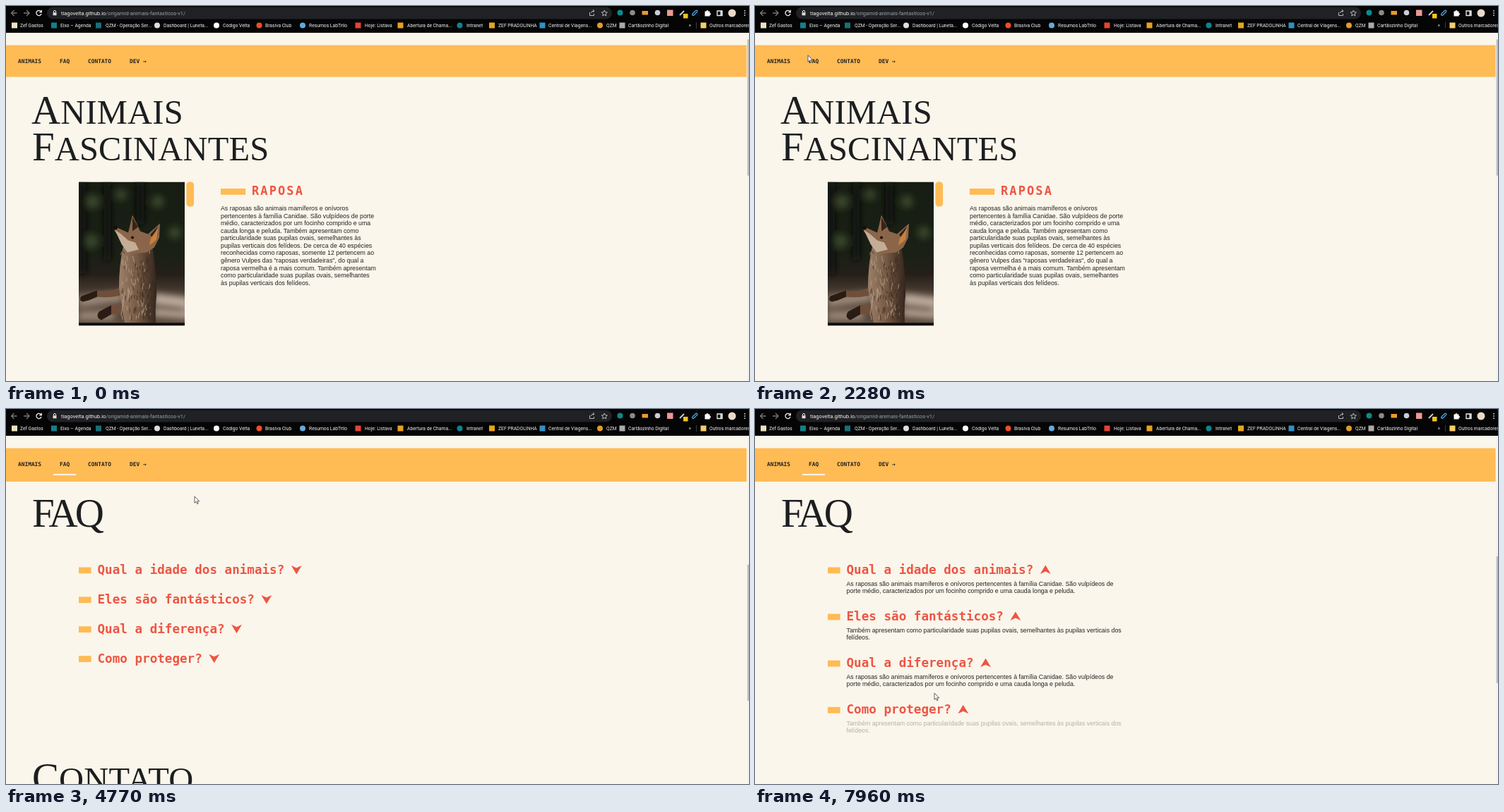
An HTML page that plays this animation: 1052 by 532 pixels, repeating every 8 s.

```html
<!DOCTYPE html>
<html lang="pt-BR">
<head>
<meta charset="utf-8">
<title>Animais</title>
<style>
html, body { margin: 0; width: 100%; height: 100%; overflow: hidden; background: #faf6eb; }
svg { display: block; }
text { white-space: pre; }
.ui { font: 6.75px Roboto, sans-serif; fill: #f4f4f4; }
.url { font-size: 7.45px; }
.nav { font: bold 7.85px "DejaVu Sans Mono", monospace; fill: #222; }
.title { font: 57px "Liberation Serif", serif; fill: #1d1e20; }
.title tspan { font-size: 48.5px; letter-spacing: .2px; }
.head { font: bold 17.6px "DejaVu Sans Mono", monospace; fill: #e54; }
.body { font: 8.8px "Liberation Sans", Arial, sans-serif; fill: #222; }
.wide { font-size: 17px; letter-spacing: 2.1px; }
.line { fill: none; stroke: #eee; stroke-width: 1.3; }
</style>
</head>
<body>
<svg width="1052" height="532" viewBox="0 0 1052 532">
  <defs>
    <linearGradient id="wood" x1="0" y1="0" x2="0" y2="1">
      <stop offset="0" stop-color="#171d12"/><stop offset=".5" stop-color="#1a2015"/>
      <stop offset=".64" stop-color="#241f19"/><stop offset=".78" stop-color="#4c3e33"/><stop offset="1" stop-color="#5d4d40"/>
    </linearGradient>
    <linearGradient id="fur">
      <stop offset="0" stop-color="#9c8069"/><stop offset=".45" stop-color="#7a5d47"/><stop offset="1" stop-color="#33251c"/>
    </linearGradient>
    <filter id="soft" x="-50%" y="-50%" width="200%" height="200%"><feGaussianBlur stdDeviation="5"/></filter>
    <clipPath id="frame"><path d="M0 0h150v204H0z"/></clipPath>
  </defs>
  <rect width="1052" height="532" fill="#faf6eb"/>

  <g id="animals">
    <g id="intro">
      <text class="title" x="36" y="166.5">A<tspan>NIMAIS</tspan></text>
      <text class="title" x="37" y="218.5">F<tspan>ASCINANTES</tspan></text>
      <g transform="translate(103 249.5)" clip-path="url(#frame)">
        <path d="M0 0h150v204H0z" fill="url(#wood)"/>
        <g filter="url(#soft)">
          <g fill="#37452a">
            <circle cx="20" cy="28" r="10"/><circle cx="60" cy="18" r="8"/><circle cx="112" cy="28" r="9"/>
            <circle cx="18" cy="84" r="10"/><circle cx="136" cy="72" r="9"/>
          </g>
          <path d="M0 0h10v130H0zM36 0h9v110h-9zM82 0h10v60h-10z" fill="#0c0f0a"/>
          <path d="M0 162l62-6v14l-62 8zM0 184l50-2v14H0z" fill="#9a8878"/>
          <path d="M106 158l50 6v30l-50-4z" fill="#bdac9c"/>
          <path d="M104 172l46 6v7l-46-4z" fill="#5b4b40"/>
        </g>
        <g fill="#6f4f39">
          <path d="M63 148Q44 158 26 154L4 162q-5 6 2 8l8-2 12-5q28 3 44-7z"/>
          <path d="M84 164Q62 178 48 174l-19 10q-6 8 3 12l14-8q28 1 46-12z"/>
        </g>
        <path d="M26 154L4 162q-5 6 2 8l8-2 12-5zM46 175l-17 9q-6 8 3 12l14-8z" fill="#2a1c14"/>
        <path d="M63 92Q57 118 57 150l8 50h44q-1-20 1-38 1-28-6-72z" fill="url(#fur)"/>
        <g id="hair" stroke-width="1.2" fill="none" opacity=".6"/>
        <path d="M50 63l9 4 11 5 2-8 4-17 6 12 5 11 11 4 8-7 9-8-1 20-7 14-10 7-22 2-9-10-8-13-7-9z" fill="#8a6549"/>
        <path d="M51 68l9 6 10 9 10 3 5 10-16 4-8-11z" fill="#c4ad95"/>
        <path d="M76 50l8 14-8 6zM112 63l-11 12 4 5z" fill="#35241b"/>
        <path d="M112 66l-2 16-10 8 2-10z" fill="#c8823f"/>
        <circle cx="52" cy="65" r="3" fill="#14100e"/><circle cx="76" cy="79" r="2" fill="#1d130e"/>
        <path d="M0 200h150v4H0z" fill="#0c0a09"/>
      </g>
      <rect x="255.5" y="249.5" width="10.6" height="35" rx="4.5" fill="#ffbb54"/>
    </g>
    <g id="about">
      <rect x="304" y="259" width="35.2" height="8.8" fill="#ffbb54"/>
      <text class="head wide" x="348" y="268">RAPOSA</text>
    </g>
  </g>

  <g id="faq">
    <text class="title" x="37" y="166.5" letter-spacing="-4">FAQ</text>
    <text class="title" x="37" id="contact">C<tspan>ONTATO</tspan></text>
  </g>

  <rect id="bar" y="55.6" width="1048.6" fill="#ffbb54"/>
  <g class="nav">
    <text x="17" y="81">ANIMAIS</text><text x="76" y="81">FAQ</text>
    <text x="116" y="81">CONTATO</text><text x="175" y="81">DEV →</text>
  </g>
  <rect id="underline" x="67"/>
  <path d="M1049 38h3v494h-3z" fill="#f4f3f1"/>
  <rect id="thumb" x="1049.7" width="2.3" fill="#bdbdbd"/>

  <g id="chrome">
    <path d="M0 0h1052v38H0z" fill="#050505"/>
    <rect x="58" y="1.5" width="800" height="17" rx="8.5" fill="#202124"/>
    <g class="line">
      <path d="M15.5 10h-8m4-4l-4 4 4 4M25 10h8m-4-4l4 4-4 4" stroke="#777"/>
      <circle id="hover" cx="46.5" cy="10" r="8.3" fill="#3b3b3b" stroke="none"/>
      <path d="M49.6 8a3.6 3.6 0 1 0 .4 3M50.3 5.8v3h-3"/>
      <path d="M67.4 9.5V8a1.6 1.6 0 0 1 3.2 0v1.5" stroke-width="1"/>
      <path d="M826.5 9v4.5h6V11M828.5 10q0-3 4-3m-1.5-2l2 2-2 2" stroke-width=".9" stroke="#ccc"/>
      <path d="M847.3 6l1.2 2.7 2.9.3-2.2 2 .6 2.9-2.5-1.5-2.5 1.5.6-2.9-2.2-2 2.9-.3z" stroke-width=".9" stroke="#ccc"/>
      <path d="M954 13l6-6" stroke="#c9ccd0" stroke-width="2"/>
      <path d="M973 12l4.5-4.5" stroke="#46a5e8" stroke-width="4" stroke-linecap="round"/>
      <path d="M973 12l4.5-4.5" stroke="#111" stroke-width="1.5" stroke-linecap="round"/>
      <path d="M1007 7h7v6.5h-7zM1012 7v6.5h1.5V7"/>
    </g>
    <path d="M66.5 9.3h5v4h-5z" fill="#ddd"/>
    <circle cx="869.5" cy="9.5" r="4" fill="#0b8a8f"/>
    <circle cx="887" cy="9.5" r="3.8" fill="#8b8b86"/>
    <path d="M900.5 7h8.5v5.5h-8.5z" fill="#e99a2c"/>
    <circle cx="922.5" cy="9.5" r="3.8" fill="#c9ced6"/>
    <path d="M936 5.5h8.5v8.5H936z" fill="#eb9a94"/>
    <path d="M959 11h6.5v6.5H959z" fill="#f5c518"/>
    <path d="M989.5 7.5h2a1.5 1.5 0 0 1 3 0h2v2.300a1.5 1.5 0 0 1 0 3v1.7h-7z" fill="#fff"/>
    <circle cx="1028" cy="10" r="5.5" fill="#ead9c9"/>
    <path d="M1046 6v1.5m0 1.7v1.5m0 1.7v1.5" stroke="#eee" stroke-width="1.5"/>
    <text class="ui url" x="78" y="12.5">tiagovelta.github.io<tspan fill="#9aa0a6">/origamid-animais-fantasticos-v1/</tspan></text>
    <path d="M977.5 23v9" stroke="#555" stroke-width=".7"/>
  </g>

  <g id="cursor" stroke="#222" stroke-width=".7" stroke-linejoin="round" fill="#fff">
    <path d="M0 0v9.3l2.2-2 1.5 3.4 1.5-.7-1.5-3.2h3z"/>
    <path d="M-1 0q1-1 2 0v4l4 1q1.5.5 1.3 2l-.8 4.5h-5.5L-3 8q-1-1.8.3-2L-1 7z"/>
    <path d="M-1.5-4.5h3M0-4.5v9M-1.5 4.5h3" stroke="#444" stroke-width="1" fill="none"/>
  </g>
</svg>
<script>
const $ = id => document.getElementById(id);
const add = (id, markup) => $(id).insertAdjacentHTML('beforeend', markup);
const set = (el, attrs) => { for (const k in attrs) el.setAttribute(k, attrs[k]); };
const text = (cls, x, y, s) => `<text class="${cls}" x="${x}" y="${y}">${s}</text>`;
const ramp = (t, start, length) => Math.min(1, Math.max(0, (t - start) / length));
const smooth = u => u * u * (3 - 2 * u);

// Seeded fur strokes over the fox's body
let seed = 7;
const random = () => (seed = seed * 16807 % 2147483647) / 2147483647;
for (let i = 0; i < 130; i++) {
  const x = 61 + 43 * random(), y = 98 + 92 * random(), light = random() < .5 - (x - 80) / 60;
  add('hair', `<path d="M${x} ${y}l${4 * random() - 2} ${4 + 5 * random()}" stroke="${light ? '#c0a88f' : '#38281e'}"/>`);
}

// Bookmarks: icon centre, text x, label, icon colour, round icon
[
  [12, 20, 'Zef Gastos', '#efe3bd'], [68, 77, 'Eixo – Agenda', '#14808a'],
  [131, 141, 'QZM - Operação Ser...', '#176f78'], [214, 223, 'Dashboard | Luneta...', '#ddd', 1],
  [298, 307, 'Código Velta', '#fff', 1], [358.5, 367, 'Brasiva Club', '#ef4e23', 1],
  [420, 429, 'Resumos LabTrilo', '#63a9dc', 1], [498.5, 508, 'Hoje: Listava', '#e44332'],
  [558.5, 568, 'Abertura de Chama...', '#e8a020'], [642.5, 652, 'Intranet', '#0f8291', 1],
  [688, 697, 'ZEF PRADOLINHA', '#e5a51d'], [759.5, 768, 'Central de Viagens...', '#2f91c4'],
  [841, 850, 'QZM', '#e29a2d', 1], [872.5, 881, 'Cartãozinho Digital', '#aaa'],
  [987.5, 996, 'Outros marcadores', '#f5cf6b']
].forEach(([cx, x, label, color, round]) => add('chrome',
  `<rect x="${cx - 4}" y="23.5" width="8" height="8" rx="${round ? 4 : 0}" fill="${color}"/>` + text('ui', x, 30, label)));
add('chrome', text('ui url', 966.5, 30, '»'));

`As raposas são animais mamíferos e onívoros
pertencentes à família Canidae. São vulpídeos de porte
médio, caracterizados por um focinho comprido e uma
cauda longa e peluda. Também apresentam como
particularidade suas pupilas ovais, semelhantes às
pupilas verticais dos felídeos. De cerca de 40 espécies
reconhecidas como raposas, somente 12 pertencem ao
gênero Vulpes das "raposas verdadeiras", do qual a
raposa vermelha é a mais comum. Também apresentam
como particularidade suas pupilas ovais, semelhantes
às pupilas verticais dos felídeos.`
  .split('\n').forEach((s, i) => add('about', text('body', 304, 290 + 10.57 * i, s)));

const answers = [
  ['As raposas são animais mamíferos e onívoros pertencentes à família Canidae. São vulpídeos de',
   'porte médio, caracterizados por um focinho comprido e uma cauda longa e peluda.'],
  ['Também apresentam como particularidade suas pupilas ovais, semelhantes às pupilas verticais dos', 'felídeos.']
];
const items = [
  ['Qual a idade dos animais?', 5600], ['Eles são fantásticos?', 6465],
  ['Qual a diferença?', 7110], ['Como proteger?', 7800]
].map(([question, opens], i) => {
  const [a, b] = answers[i % 2];
  add('faq', `<g><rect x="103" y="224.5" width="17.6" height="8.8" fill="#ffbb54"/>
    ${text('head', 129.5, 234, question)}
    <path d="M-7.5-6L0 6.5 7.5-6 0-2.5z" fill="#e54"/>
    <g>${text('body', 129.5, 250.7, a)}${text('body', 129.5, 260.7, b)}</g></g>`);
  const group = $('faq').lastElementChild;
  return { group, opens, arrow: group.querySelector('path'), answer: group.querySelector('g'),
           arrowX: 129.5 + 10.59 * question.length + 17 };
});

// Pointer path: time, x, y, shape (0 arrow, 1 hand, 2 text beam)
const path = [
  [70, 965, 512, 0], [400, 420, 200, 0], [690, 46, 17, 0], [830, 46, 17, 0], [960, 46, 12, 0],
  [1740, 47, 12, 0], [1930, 60, 30, 0], [2450, 80, 83, 1], [4560, 80, 83, 0], [4770, 267, 124, 0],
  [5060, 300, 222, 2], [5300, 270, 232, 2], [5600, 270, 229, 2], [6130, 270, 265, 0],
  [6400, 270, 296, 2], [6540, 270, 313, 2], [6800, 266, 340, 2], [7060, 262, 360, 2],
  [7150, 262, 360, 2], [7600, 256, 421, 2], [7820, 255, 421, 0], [7960, 254, 403, 0]
];

function movePointer(t) {
  const i = path.findLastIndex(p => p[0] <= t);
  $('cursor').style.display = i < 0 ? 'none' : '';
  if (i < 0) return;
  const [t0, x0, y0, shape] = path[i], [t1, x1, y1] = path[Math.min(i + 1, path.length - 1)];
  const u = smooth(ramp(t, t0, t1 - t0 || 1));
  set($('cursor'), { transform: `translate(${x0 + (x1 - x0) * u} ${y0 + (y1 - y0) * u})` });
  [...$('cursor').children].forEach((el, n) => { el.style.display = n === shape ? '' : 'none'; });
}

function reveal(id, p) {
  set($(id), { opacity: p, transform: `translate(${-22 * (1 - p)} 0)` });
}

function draw(t) {
  const reloaded = t >= 1180;
  reveal('intro', reloaded ? ramp(t, 1140, 800) : 1);
  reveal('about', reloaded ? ramp(t, 1540, 400) : 1);
  $('hover').style.display = t >= 830 && t < 1880 ? '' : 'none';

  const scroll = Math.round(443 * smooth(ramp(t, 3177, 770)));
  set($('animals'), { transform: `translate(0 ${-scroll})` });
  set($('faq'), { transform: `translate(0 ${443 - scroll})` });

  const hovered = ramp(t, 2450, 200), active = ramp(t, 3300, 150);
  set($('bar'), { height: 45 + hovered * .8 + active * 1.7 });
  set($('underline'), { y: 91.7 + active * .4, width: 32 * hovered, height: 1 + active, fill: active ? '#faf6eb' : '#222' });

  let grown = 0;
  items.forEach(({ group, opens, arrow, answer, arrowX }, i) => {
    const p = ramp(t, opens, 500);
    set(group, { transform: `translate(0 ${41.9 * i + grown})` });
    set(arrow, { transform: `translate(${arrowX} 228) scale(1 ${p ? -1 : 1})` });
    set(answer, { opacity: p });
    grown += Math.min(24.2, 60 * p);
  });
  set($('contact'), { y: 541.5 + grown });

  const scale = 1264 / (1264 + grown);
  set($('thumb'), { y: 47.5 + scroll * .391 * scale, height: 193 * scale });
  movePointer(t);
}

function tick() {
  draw(performance.now() % 8000);
  requestAnimationFrame(tick);
}
tick();
</script>
</body>
</html>
```
